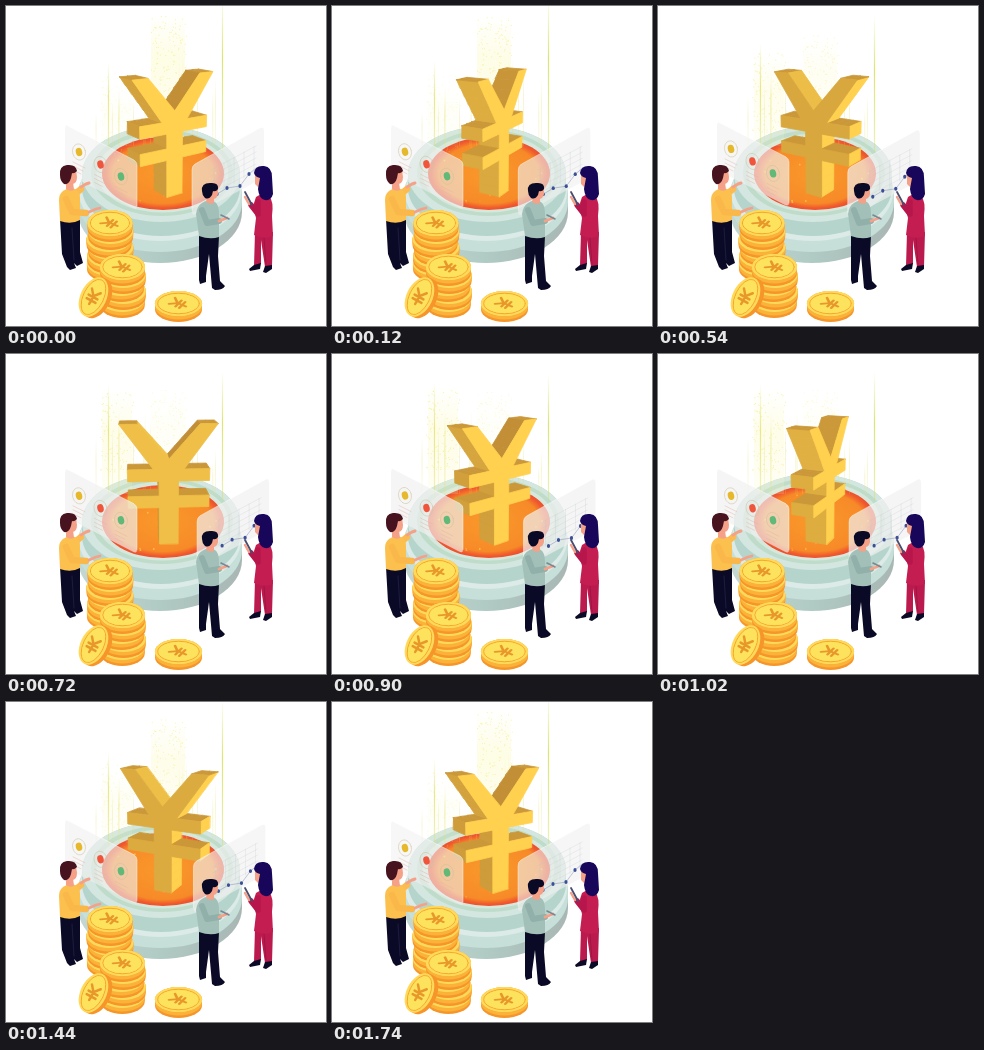
Animation, 320 px wide and 320 px high, one loop 1800 ms. Source, as an HTML page with a canvas:

```html
<!DOCTYPE html>
<html lang="en">
<head>
<meta charset="utf-8">
<title>Coins and platform</title>
<style>
html, body { margin: 0; width: 100%; height: 100%; overflow: hidden; background: #fff; }
canvas { display: block; width: 100vw; height: 100vh; }
</style>
</head>
<body>
<canvas id="stage" width="320" height="320"></canvas>
<script>
const ctx = document.getElementById('stage').getContext('2d');
const STEP = 60, COUNT = 30, TAU = Math.PI * 2;

const mix = (a, b, t) => a + (b - a) * t;

function fill(d, color) {
  ctx.fillStyle = color;
  ctx.fill(new Path2D(d));
}

function line(d, color, width = 1) {
  ctx.strokeStyle = color;
  ctx.lineWidth = width;
  ctx.stroke(new Path2D(d));
}

function oval(x, y, rx, ry, color, rot = 0) {
  ctx.fillStyle = color;
  ctx.beginPath();
  ctx.ellipse(x, y, rx, ry, rot, 0, TAU);
  ctx.fill();
}

function ring(x, y, rx, ry, color, width = 1, rot = 0) {
  ctx.strokeStyle = color;
  ctx.lineWidth = width;
  ctx.beginPath();
  ctx.ellipse(x, y, rx, ry, rot, 0, TAU);
  ctx.stroke();
}

function drum(x, top, bottom, rx, ry, color) {
  ctx.fillStyle = color;
  ctx.beginPath();
  ctx.ellipse(x, top, rx, ry, 0, Math.PI, TAU);
  ctx.ellipse(x, bottom, rx, ry, 0, 0, Math.PI);
  ctx.fill();
}

function random(seed) {
  return () => {
    seed = (seed * 16807) % 2147483647;
    return seed / 2147483647;
  };
}

// Platform

function platform() {
  const base = ctx.createLinearGradient(72, 0, 236, 0);
  base.addColorStop(0, '#c4d8d3');
  base.addColorStop(.5, '#b0cac4');
  base.addColorStop(1, '#a9b7b4');
  drum(154, 198, 206, 82, 51, base);
  drum(154, 188, 196, 82, 50, '#c6dfd8');
  oval(154, 187, 81, 48, '#dcebe7');
  drum(155, 168, 182, 79, 48, '#b5d5cc');
  oval(155, 168, 79, 48, '#d3e6e0');
  oval(156, 167, 71, 43, '#bfdccb');
  oval(156.5, 167, 66, 39.5, '#d6e8dc');
  const pool = ctx.createRadialGradient(0, 0, 0, 0, 0, 61);
  pool.addColorStop(0, '#f9992a');
  pool.addColorStop(.82, '#f78a28');
  pool.addColorStop(.94, '#f05a2d');
  pool.addColorStop(1, '#ee4f2e');
  ctx.save();
  ctx.translate(157, 167.5);
  ctx.scale(1, .6);
  oval(0, 0, 61, 61, pool);
  ctx.restore();
}

function sparks(frame) {
  const rnd = random(91);
  for (let i = 0; i < 22; i++) {
    const a = rnd() * TAU, r = Math.sqrt(rnd()) * .9, phase = rnd();
    ctx.globalAlpha = .35 + .35 * Math.sin(TAU * (frame / (COUNT - 1) + phase));
    oval(157 + 60 * r * Math.cos(a), 167 + 36 * r * Math.sin(a), .9, .9, '#ffd257');
  }
  ctx.globalAlpha = 1;
}

// Light rising from the pool

function beam(x, top, bottom, width, color, alpha) {
  const g = ctx.createLinearGradient(0, top, 0, bottom);
  g.addColorStop(0, `rgba(${color},0)`);
  g.addColorStop(.4, `rgba(${color},${alpha})`);
  g.addColorStop(1, `rgba(${color},${alpha * .5})`);
  ctx.fillStyle = g;
  ctx.fillRect(x - width / 2, top, width, bottom - top);
}

function dust(rnd, count, x, y, w, h, alpha) {
  ctx.globalAlpha = alpha;
  ctx.fillStyle = '#f2ee7c';
  for (let i = 0; i < count; i++) ctx.fillRect(x + rnd() * w, y + rnd() * h, 1, 1);
  ctx.globalAlpha = 1;
}

function light(p) {
  const rnd = random(37);
  beam(162, mix(8, 44, p), 120, 34, '252,249,190', mix(.4, .1, p));
  beam(111, mix(80, 32, p), 140, 30, '252,249,190', mix(.1, .35, p));
  beam(102.5, mix(56, 28, p), 146, 1.2, '222,222,95', .7);
  beam(216.5, mix(-12, 20, p), 146, 1.2, '214,224,90', .85);
  for (let i = 0; i < 16; i++) {
    const x = 90 + rnd() * 122, top = 60 + rnd() * 40, side = x < 150 ? -1 : 1;
    beam(x, top + side * (p - .5) * 26, 140, .8, '228,226,110', .4);
  }
  dust(rnd, 110, 145, mix(10, 38, p), 35, 75, mix(.6, .3, p));
  dust(rnd, 110, 94, mix(70, 36, p), 34, 80, mix(.25, .65, p));
}

// Turning currency sign: an extruded outline seen from slightly above

const half = [[9.5, -4], [9.5, 35], [40, 35], [40, 47], [9.5, 47], [9.5, 62],
  [40, 62], [40, 74], [15, 74], [47, 118], [30, 118], [0, 84]];
const outline = half.concat(half.slice(0, -1).reverse().map(([u, v]) => [-u, v]));
const DEPTH = 11.5, TILT = .27, EYE = 450;

function gold(nx, up) {
  const t = Math.min(1, Math.max(0, .7 + nx * .6 - up * .55));
  return `rgb(${mix(194, 255, t) | 0},${mix(143, 209, t) | 0},${mix(54, 78, t) | 0})`;
}

function area(pts) {
  return pts.reduce((sum, q, i) => {
    const r = pts[(i + 1) % pts.length];
    return sum + q[0] * r[1] - r[0] * q[1];
  }, 0);
}

function face(pts, color) {
  ctx.beginPath();
  pts.forEach(q => ctx.lineTo(q[0], q[1]));
  ctx.closePath();
  ctx.fillStyle = ctx.strokeStyle = color;
  ctx.lineWidth = .8;
  ctx.fill();
  ctx.stroke();
}

function sign(angle) {
  const c = Math.cos(angle), s = Math.sin(angle), level = Math.sqrt(1 - TILT * TILT);
  const project = ([u, v], w) => {
    const z = u * s - w * c, h = v - 60;
    const far = z * level - h * TILT;
    const k = EYE / (EYE + far);
    return [162 + (u * c + w * s) * k, 126 - (h * level + z * TILT) * k, far];
  };
  const sides = [];
  outline.forEach((a, i) => {
    const b = outline[(i + 1) % outline.length];
    const du = b[0] - a[0], dv = b[1] - a[1], len = Math.hypot(du, dv);
    const n = Math.ceil(len / 12);
    const at = k => [a[0] + du * k / n, a[1] + dv * k / n];
    for (let k = 0; k < n; k++) {
      const p = at(k), q = at(k + 1);
      const pts = [project(p, -DEPTH), project(p, DEPTH), project(q, DEPTH), project(q, -DEPTH)];
      if (area(pts) <= 0) continue;
      const far = pts.reduce((sum, r) => sum + r[2], 0);
      sides.push({ pts, far, color: gold(dv / len * c, Math.max(0, -du / len)) });
    }
  });
  sides.sort((a, b) => b.far - a.far).forEach(f => face(f.pts, f.color));
  const front = outline.map(q => project(q, DEPTH));
  if (area(front) < 0) face(front, gold(s, 0));
  const back = outline.map(q => project(q, -DEPTH));
  if (area(back) > 0) face(back, gold(-s, 0));
}

// Floating glass panels

function leftPanel(p) {
  ctx.save();
  ctx.translate(0, -4.5 * p);
  fill('M59 122Q59 118 62 120L128 154Q131 156 131 159V200Q131 204 127 202L63 169Q59 167 59 163Z',
    `rgba(241,241,241,${mix(.58, .68, p)})`);
  line('M59 122Q59 118 62 120L128 154Q131 156 131 159V200', 'rgba(255,255,255,.55)', .8);
  [[73, 146, '#e6b92c'], [94.5, 158.5, '#f0553c'], [115, 170.5, '#5fb978']].forEach(([x, y, color]) => {
    ring(x, y, 6.4, 8.2, 'rgba(205,195,160,.7)', .8, -.25);
    oval(x, y, 3.2, 4.2, color, -.25);
    for (let i = 0; i < 3; i++) {
      const top = y + 13 + i * 4;
      line(`M${x - 6} ${top - 3}L${x + 6 - i * 2} ${top + 3 - i}`, 'rgba(225,180,165,.65)', .7);
    }
  });
  ctx.restore();
}

function rightPanel(p) {
  ctx.save();
  ctx.translate(5.5 * p, 4 * p);
  fill('M186 164Q186 160 189 158L254 122Q258 120 258 124V167Q258 171 255 173L190 208Q186 210 186 206Z',
    `rgba(241,241,241,${mix(.6, .7, p)})`);
  line('M186 204V164Q186 160 189 158L254 122Q258 120 258 124', 'rgba(255,255,255,.55)', .8);
  for (let i = 0; i < 5; i++) {
    line(`M205 ${164 + i * 6}L250 ${140 + i * 6}`, 'rgba(190,195,205,.4)', .6);
    line(`M${208 + i * 10} ${162 - i * 5.3}V${188 - i * 5.3}`, 'rgba(190,195,205,.4)', .6);
  }
  line('M211 188L221 182L234 180L243 168L250 162', 'rgba(90,100,160,.5)', .7);
  [[211, 188], [221, 182], [234, 180], [243, 168]].forEach(([x, y]) => oval(x, y, 1.6, 1.9, '#3b4f96'));
  ctx.restore();
}

// People

const NAVY = '#0b0a26', SKIN = '#f4a188';

function leftMan() {
  fill('M54 213L74 212L74 246L77 257L71 260L68 257L70 262L64 264L61 261L56 248Z', NAVY);
  line('M66 222L68 254', '#25254a', .7);
  line('M69 188L75 183', '#fbbb52', 6.5);
  line('M75 181L80 178L83 177', SKIN, 3);
  fill('M57 185Q62 181 69 183Q74 185 74 192L74 214Q65 219 54 215L53 194Q53 188 57 185Z', '#fcc04f');
  line('M60 193L66 206L80 207', '#fbb84a', 6.5);
  line('M83 206L90 203L94 202', SKIN, 2.8);
  fill('M60 176L67 176L68 184Q64 186 60 183Z', SKIN);
  fill('M62 165L70 164L71 171Q71 178 66 178L61 177Z', SKIN);
  fill('M54 169Q53 160 61 159Q70 158 71 165Q68 168 66 167L65 172Q63 179 58 178Q54 175 54 169Z', '#47131f');
}

function middleMan() {
  fill('M193 230L213 230L212 250L214 275L219 280Q217 284 209 284L206 282L203 248L200 270L200 276L194 278L193 274Z', NAVY);
  fill('M196 197Q201 193 209 196Q213 199 213 207L213 231Q204 234 193 230L190 208Q191 200 196 197Z', '#a2c0b8');
  line('M196 204L201 217L213 215', '#92b0aa', 6);
  line('M213 215L221 212', SKIN, 2.8);
  line('M215 209L223 213', '#7b8794', 1.6);
  fill('M201 190L208 190L208 197Q204 199 200 196Z', SKIN);
  fill('M203 181L212 181L212 188Q211 193 207 193L202 191Z', SKIN);
  fill('M196 185Q195 177 204 177Q213 176 212 183Q210 186 207 185L206 189Q203 194 199 192Q196 189 196 185Z', NAVY);
}

function woman() {
  fill('M249 226L267 226L266 260L259 261L255 234L255 258L248 260Z', '#bb1a4e');
  fill('M248 259L255 257L254 263L244 265L243 263Z', NAVY);
  fill('M259 260L266 259L266 263L260 267L257 266Z', NAVY);
  line('M258 232L260 258', '#93143f', .7);
  fill('M250 191Q256 186 263 190Q268 195 266 210L267 230Q258 234 248 229L250 212L247 200Z', '#c41d52');
  line('M252 196L252 208L245 199', '#b6164b', 5.5);
  line('M243 198L239 191', SKIN, 2.4);
  line('M239 186L246 199', '#4b4d70', 1.8);
  fill('M249 166L256 165L257 181L253 182L249 178Z', SKIN);
  fill('M248 167Q249 159 258 160Q266 161 266 171L267 188Q265 195 259 194Q253 193 252 183L254 172Q249 171 248 167Z', '#17065a');
}

// Coins

function yen(x, y, size, squash, rot) {
  ctx.save();
  ctx.translate(x, y);
  ctx.scale(1, squash);
  ctx.rotate(rot);
  ctx.scale(size, size);
  line('M-5 -7L0 -1L5 -7M0 -1V8M-5 0H5M-5 4H5', '#e8982a', 2.5);
  ctx.restore();
}

function coinFace(x, y, rx, ry, rot = 0) {
  oval(x, y, rx, ry, '#ffd95a', rot);
  ring(x, y, rx - 2.8, ry - 2.2, '#f6a72c', 1, rot);
  oval(x, y, rx - 3.6, ry - 2.9, '#fde25e', rot);
}

function pile(x, y, rx, ry, n) {
  for (let i = n - 1; i >= 0; i--) {
    const cx = x + (i ? Math.sin(i * 2.4) : 0), cy = y + i * 8;
    drum(cx, cy, cy + 6, rx, ry, '#f6952a');
    drum(cx, cy, cy + 3.5, rx, ry, '#fbb238');
    oval(cx, cy, rx, ry, '#ffd95a');
  }
  coinFace(x, y, rx, ry);
  yen(x, y, 1.1, .65, -1);
}

function coins() {
  pile(104, 217, 22.5, 13, 6);
  pile(116.5, 261, 22.5, 13, 5);
  pile(172.5, 297.5, 23.5, 12.5, 1);
  oval(91, 292, 13.5, 21.5, '#f6952a', .45);
  coinFace(87.5, 291, 13, 21, .45);
  yen(87, 291, 1, 1, .5);
}

function draw(frame) {
  const turn = frame / (COUNT - 1);
  const p = (1 - Math.cos(turn * TAU)) / 2;
  ctx.fillStyle = '#fff';
  ctx.fillRect(0, 0, 320, 320);
  ctx.lineJoin = ctx.lineCap = 'round';
  platform();
  sparks(frame);
  light(p);
  sign((turn * 360 + 35) * Math.PI / 180);
  leftPanel(p);
  rightPanel(p);
  leftMan();
  woman();
  middleMan();
  coins();
}

const start = performance.now();
function tick() {
  draw(Math.floor((performance.now() - start) / STEP) % COUNT);
  requestAnimationFrame(tick);
}
tick();
</script>
</body>
</html>
```
